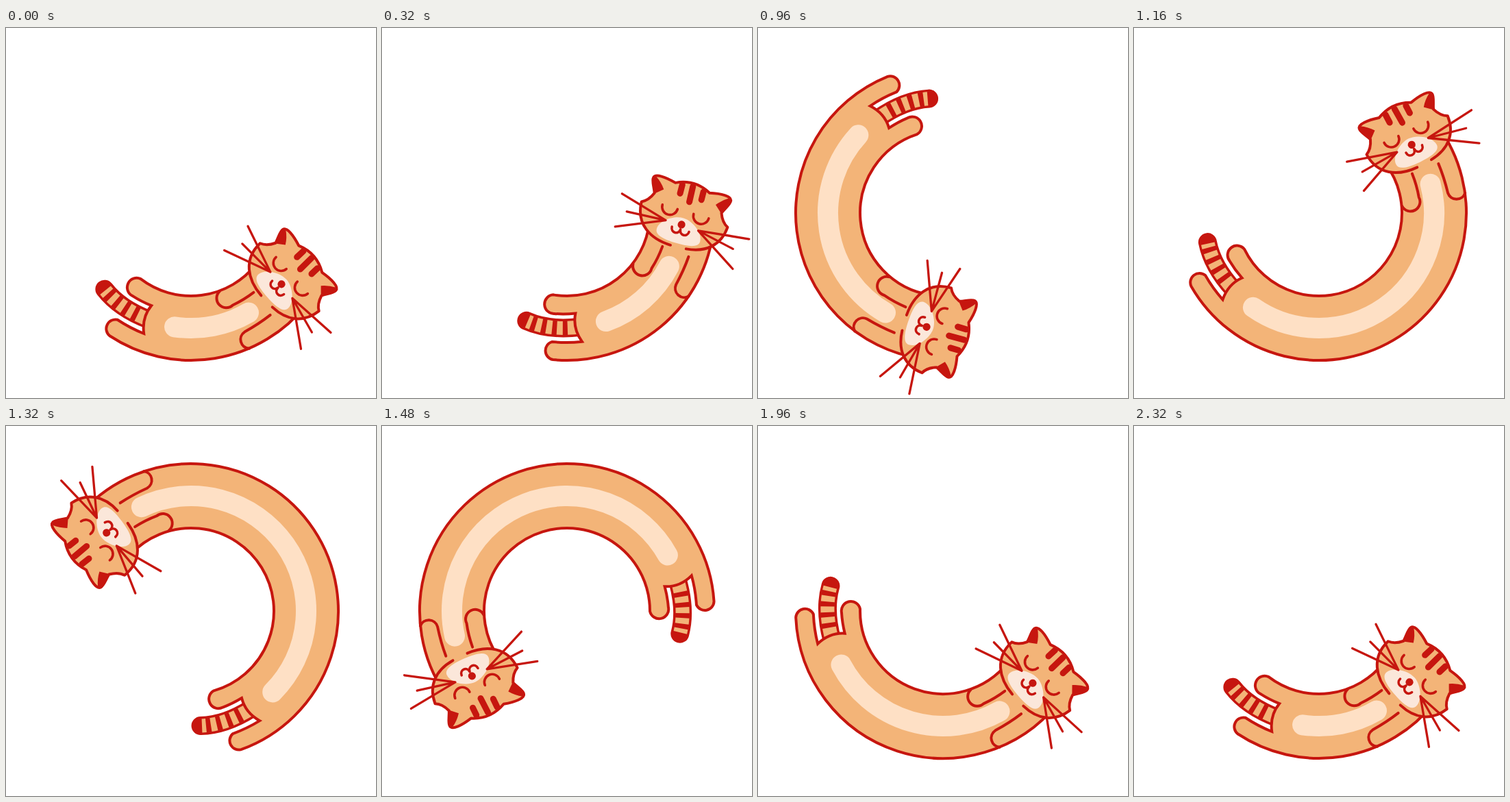
Write an HTML page that moves like this. It is 540 px wide and 540 px high and loops after 2.6 s.

```html
<!DOCTYPE html>
<html lang="en">
<head>
<meta charset="utf-8">
<title>Stretching cat</title>
<style>
  html, body { margin: 0; height: 100%; overflow: hidden; background: #fff; }
  svg { display: block; width: 100vw; height: 100vh; }
  .line { fill: none; stroke: #c6160f; stroke-width: 4; stroke-linecap: round; stroke-linejoin: round; }
  .skin { fill: #f3b478; }
  .dark { fill: #c6160f; }
  .pale { fill: none; stroke: #fee0c5; stroke-width: 30; stroke-linecap: round; }
</style>
</head>
<body>
<svg viewBox="0 0 540 540">
  <g transform="translate(270 270)">
    <g id="rear">
      <path class="line" style="stroke-width:27" d="M128,109 Q153,83 163,38"/>
      <path d="M128,109 Q153,83 163,38" fill="none" stroke="#f3b478" stroke-width="20"
            stroke-dasharray="0 2 6 7 8.5 7 8.5 7 8.5 7 40"/>
      <path id="body" class="line skin" style="stroke-linejoin:miter"/>
      <path id="belly" class="pale"/>
    </g>
    <g id="front">
      <path class="line" d="M143.5,34.5 Q139,52 131,68 A13.6,13.6 0 0 1 103.5,64"/>
      <path class="line" d="M183,45.5 Q178,66 168.8,88 A13.3,13.3 0 0 0 189,103"/>
      <g transform="translate(168 0) rotate(10.8)">
        <path class="line skin" d="M-7,33.2 C-38,33 -64,18 -65.5,-15.5 Q-56,-20 -51,-33
          C-54,-41 -60,-49 -59,-54 C-58,-61 -42,-60 -26,-56 Q0,-69 26,-56
          C42,-60 58,-61 59,-54 C60,-49 54,-41 51,-33 Q56,-20 65.5,-15.5 C64,12 46,29 16.5,32"/>
        <path class="dark" d="M-51,-32 C-54,-41 -60,-49 -59,-55 L-56,-57 Q-46,-51 -39.5,-42 Z
          M51,-32 C54,-41 60,-49 59,-55 L56,-57 Q46,-51 39.5,-42 Z"/>
        <path class="line" style="stroke-width:9" d="M-15.5,-56 L-15,-43 M0,-58 L1.5,-35 M17,-55 L17.5,-43"/>
        <path fill="#fbe7da" d="M0,-10 C14,-10 33,3 33,16 C33,25 20,28 0,28 C-20,28 -33,25 -33,16 C-33,3 -14,-10 0,-10"/>
        <path class="line" style="stroke-width:3.6" d="M-35,-20 A11.5,11.5 0 0 0 -12,-20 M12.5,-20 A11.5,11.5 0 0 0 35.5,-20
          M-12.5,7 C-12,16 0,16 0.5,7 C1,16 13,16 13.5,7"/>
        <circle class="dark" r="5.6"/>
        <path class="line" style="stroke-width:3.3" d="M-96,-18.5 L-24,.5 L-82,4.5 M-24,.5 L-92,30.5
          M100.5,-8 L26,1.5 L82,12.5 M26,1.5 L90,40.5"/>
      </g>
    </g>
  </g>
</svg>
<script>
const LOOP = 2600, STEP = 40;
const OUTER = 215, INNER = 121, MID = 168;

// Rows: seconds, degrees travelled, degrees per second
const HEAD = [[0, 0, 0], [.32, 32.4, 207], [.64, 133, 418], [.96, 300, 620],
              [1.32, 535.4, 550], [1.68, 679.8, 258], [2, 720, 0]];
const TAIL = [[0, 0, 0], [.32, 28, 168], [.64, 107.4, 325], [.96, 235.6, 452],
              [1.32, 413.4, 482], [1.68, 570.5, 392], [2.32, 720, 0]];

const [rear, front, body, belly] =
  ['rear', 'front', 'body', 'belly'].map(id => document.getElementById(id));

// Smooth travel through the rows
function travel(rows, t) {
  const i = rows.findIndex(row => row[0] > t);
  if (i < 0) return rows[rows.length - 1][1];
  const [t0, p0, v0] = rows[i - 1], [t1, p1, v1] = rows[i];
  const h = t1 - t0, u = (t - t0) / h, w = 1 - u;
  return w * w * (1 + 2 * u) * p0 + u * u * (1 + 2 * w) * p1
       + h * u * w * (w * v0 - u * v1);
}

function polar(r, deg) {
  const a = deg * Math.PI / 180;
  return (r * Math.cos(a)).toFixed(2) + ',' + (r * Math.sin(a)).toFixed(2);
}

function arc(r, from, to) {
  const large = Math.abs(to - from) > 180 ? 1 : 0;
  return `A${r},${r} 0 ${large} ${to > from ? 1 : 0} ${polar(r, to)}`;
}

function draw(ms) {
  const t = Math.floor(ms % LOOP / STEP) * STEP / 1000;
  const head = 38.2 - travel(HEAD, t);
  const tail = 98.2 - travel(TAIL, t);
  const neck = head - tail;

  rear.setAttribute('transform', `rotate(${tail})`);
  front.setAttribute('transform', `rotate(${head})`);
  body.setAttribute('d',
    `M${polar(OUTER, 25.3)} ${arc(OUTER, 25.3, neck)} L${polar(INNER, neck)} ${arc(INNER, neck, 29.2)}
     A13.6,13.6 0 0 0 132,67 Q138,54 142,38 Q161,49.5 184,43 Q179,64 169.5,84
     A13.4,13.4 0 0 0 ${polar(OUTER, 25.3)} Z`);
  belly.setAttribute('d', `M${polar(MID, 0)} ${arc(MID, 0, neck + 21.8)}`);
}

function frame() {
  draw(performance.now());
  requestAnimationFrame(frame);
}
frame();
</script>
</body>
</html>
```
